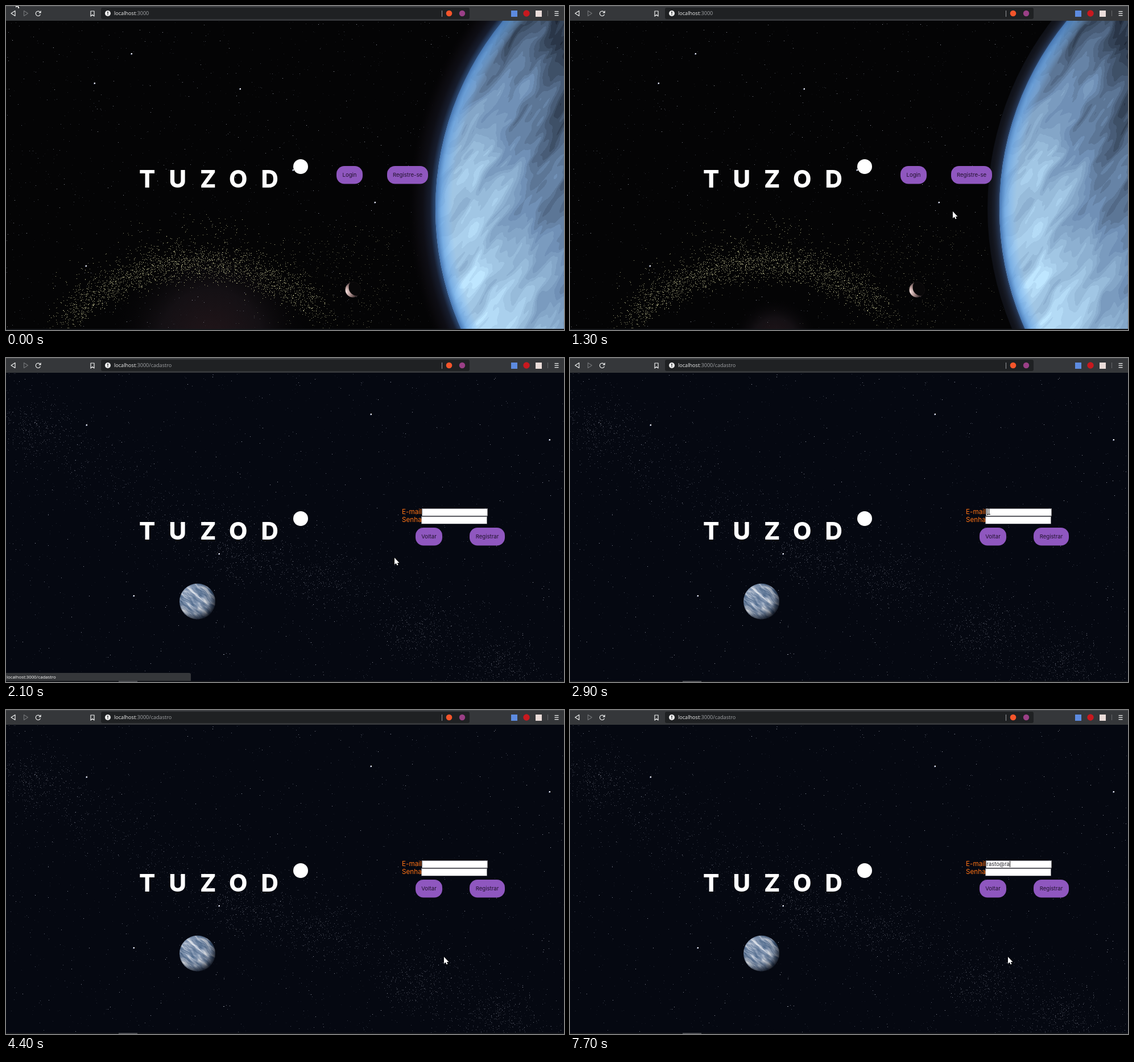
Recreate the animation shown at these times as an HTML page with a canvas. Size 981 by 571 pixels, loop 8000 ms.

```html
<!DOCTYPE html>
<html lang="pt">
<head>
<meta charset="utf-8">
<title>Viagens</title>
<style>
html, body { margin: 0; width: 100%; height: 100%; overflow: hidden; background: #040405; }
canvas { display: block; }
</style>
</head>
<body>
<canvas id="stage" width="981" height="571"></canvas>
<script>
const W = 981, H = 571, LOOP = 8000, TOP = 27;
const TAU = Math.PI * 2;
const ctx = document.getElementById('stage').getContext('2d');
const UI = '"Open Sans", "Noto Sans", sans-serif';
const BODY = 'Inter, "Open Sans", sans-serif';

const mix = (a, b, f) => a + (b - a) * f;
const clamp = v => Math.min(1, Math.max(0, v));

function seeded(a) {
  const rnd = () => {
    a = (a + 0x6D2B79F5) | 0;
    let t = Math.imul(a ^ (a >>> 15), 1 | a);
    t = (t + Math.imul(t ^ (t >>> 7), 61 | t)) ^ t;
    return ((t ^ (t >>> 14)) >>> 0) / 4294967296;
  };
  rnd.gauss = () => rnd() + rnd() + rnd() + rnd() - 2;
  return rnd;
}

function hash(i, j) {
  const s = Math.sin(i * 127.1 + j * 311.7) * 43758.5453;
  return s - Math.floor(s);
}

function noise(x, y) {
  const i = Math.floor(x), j = Math.floor(y);
  const ease = f => f * f * (3 - 2 * f);
  const u = ease(x - i);
  return mix(mix(hash(i, j), hash(i + 1, j), u),
    mix(hash(i, j + 1), hash(i + 1, j + 1), u), ease(y - j));
}

function layer(w, h, paint) {
  const c = document.createElement('canvas');
  c.width = w; c.height = h;
  paint(c.getContext('2d'));
  return c;
}

function disc(g, x, y, r, fill) {
  g.fillStyle = fill;
  g.beginPath();
  g.arc(x, y, r, 0, TAU);
  g.fill();
}

function poly(g, pts, fill) {
  g.beginPath();
  pts.forEach(([x, y]) => g.lineTo(x, y));
  g.closePath();
  if (fill) { g.fillStyle = fill; g.fill(); }
}

function rect(g, x, y, w, h, fill, r = 0) {
  g.fillStyle = fill;
  g.beginPath();
  g.roundRect(x, y, w, h, r);
  g.fill();
}

function label(g, text, x, y, font, fill, align = 'left') {
  g.font = font;
  g.fillStyle = fill;
  g.textAlign = align;
  g.fillText(text, x, y);
}

function radial(g, x, y, r0, r1, ...colors) {
  const fill = g.createRadialGradient(x, y, r0, x, y, r1);
  colors.forEach((c, i) => fill.addColorStop(i / (colors.length - 1), c));
  return fill;
}

function dot(g, x, y, color, alpha, size = 1) {
  g.globalAlpha = alpha;
  g.fillStyle = color;
  g.fillRect(Math.round(x), Math.round(y), size, size);
  g.globalAlpha = 1;
}

function sky(g, rnd, count, tint) {
  for (let i = 0; i < count; i++) {
    const big = i % 9 === 0;
    dot(g, rnd() * W, TOP + rnd() * 540, big ? '#d5daea' : tint,
      big ? 0.35 + rnd() * 0.4 : 0.1 + 0.45 * rnd() ** 3);
  }
}

function brightStars(g, list) {
  list.forEach(([x, y]) => {
    dot(g, x - 1, y, '#aebbe8', 0.45, 3);
    dot(g, x, y, '#ffffff', 0.9, 2);
  });
}

function ring(g, color) {
  const rnd = seeded(41);
  for (let i = 0; i < 2700; i++) {
    const x = 325 + (rnd() - 0.5) * 450 + rnd.gauss() * 32;
    let y = 455 + 105 * ((x - 340) / 247) ** 2 + rnd.gauss() * 29;
    if (rnd() < 0.25) y += Math.log(1 - rnd() * 0.95) * 30;
    if (y < 567) dot(g, x, y, color, 0.5 + rnd() * 0.5);
  }
  for (let i = 0; i < 420; i++) {
    dot(g, 600 + rnd.gauss() * 110, 385 + rnd() * 182, color, 0.15 + rnd() * 0.5);
  }
}

// Streaked ball in flat tones; light(x, y) gives its brightness from 0 to 1
function globe(g, cx, cy, r, scale, angle, contrast, ramp, light) {
  const x0 = Math.floor(cx - r), y0 = Math.max(0, Math.floor(cy - r));
  const w = Math.min(W, Math.ceil(cx + r)) - x0, h = Math.min(H, Math.ceil(cy + r)) - y0;
  const cos = Math.cos(angle), sin = Math.sin(angle);
  const skin = layer(w, h, s => {
    const img = s.createImageData(w, h);
    for (let k = 0; k < w * h; k++) {
      const x = x0 + k % w, y = y0 + Math.floor(k / w);
      const u = (x * cos + y * sin) / scale;
      const v = (y * cos - x * sin) / scale + 16 * noise(x / scale / 50, y / scale / 50);
      const n = 0.65 * noise(u / 85, v / 22) + 0.35 * noise(u / 32, v / 7) - 0.5;
      const tone = Math.round(clamp(light(x, y) + n * contrast) * 16) / 8;
      const i = tone < 1 ? 0 : 1;
      for (let c = 0; c < 3; c++) img.data[k * 4 + c] = mix(ramp[i][c], ramp[i + 1][c], tone - i);
      img.data[k * 4 + 3] = 255;
    }
    s.putImageData(img, 0, 0);
  });
  g.save();
  g.beginPath();
  g.arc(cx, cy, r, 0, TAU);
  g.clip();
  g.drawImage(skin, x0, y0);
  g.restore();
}

function planet(g, soft) {
  const x = 1277, y = 357, r = 522, reach = r + (soft ? 48 : 21);
  disc(g, x, y, reach, soft
    ? radial(g, x, y, r - 3, reach, '#33598c', '#171d2e', '#0e0e15', '#09080b', 'rgba(6,5,7,0)')
    : radial(g, x, y, r - 3, reach, '#33598c', '#222f48', '#191e2b', '#12141c', '#0e1017'));
  globe(g, x, y, r, 1, -0.95, 0.42, [[32, 41, 56], [112, 144, 182], [190, 230, 255]],
    (px, py) => 0.6 - 0.0027 * (px - 800) + 0.0008 * (py - TOP)
      - 0.18 * clamp(1 - (r - Math.hypot(px - x, py - y)) / 60));
  disc(g, x, y, r, radial(g, x, y, r - 30, r,
    'rgba(130,188,244,0)', 'rgba(122,180,240,.4)', 'rgba(100,162,228,.65)', '#4474b0'));
}

function moon(g) {
  g.save();
  g.beginPath();
  g.arc(610, 500, 13.5, 0, TAU);
  g.clip();
  g.fillStyle = radial(g, 597, 504, 1, 19, '#f6dfdc', '#a98c8a', '#3d2f30');
  g.fillRect(594, 484, 34, 34);
  disc(g, 617, 496, 14.5, '#080708');
  g.restore();
}

function wordmark(g) {
  g.letterSpacing = '24px';
  label(g, 'TUZOD', 234, 320, '800 42px ' + BODY, '#fff');
  g.letterSpacing = '0px';
  disc(g, 518, 283, 13, '#fff');
}

function button(g, text, x, y, w) {
  rect(g, x, y, w, 31.5, '#8f57bf', 14);
  label(g, text, x + w / 2, y + 19.2, '9.6px ' + BODY, '#20122c', 'center');
}

function chrome(g) {
  const light = '#eceded', bar = '#1f2123';
  rect(g, 0, 0, W, 26, '#35373a');
  rect(g, 0, 0, W, 1, '#4a4c4f');
  rect(g, 167, 3, 648, 20, bar, 3);
  g.lineWidth = 1.2;
  g.lineJoin = 'round';
  [[9, 7, light], [38.5, -7, '#707275']].forEach(([x, d, color]) => {
    g.strokeStyle = color;
    poly(g, [[x, 13], [x + d, 8.5], [x + d, 17.5]]);
    g.stroke();
  });
  g.strokeStyle = light;
  poly(g, [[149, 9], [155, 9], [155, 18], [152, 15.4], [149, 18]]);
  g.stroke();
  g.beginPath();
  g.arc(56.5, 13.3, 4.2, 0.35, 5.4);
  g.stroke();
  poly(g, [[61.6, 8], [61.6, 12.4], [57.2, 12.4]], light);
  disc(g, 179, 13, 5, '#f2f2f2');
  rect(g, 178.3, 9.8, 1.4, 4, bar);
  rect(g, 178.3, 14.7, 1.4, 1.4, bar);
  rect(g, 766, 8, 1, 11, '#96989b');
  rect(g, 952, 8, 1, 10, '#646669');
  disc(g, 779, 13, 5.3, '#f4552b');
  disc(g, 802, 13, 5.2, '#9a3f86');
  rect(g, 888, 8, 11, 11, '#5d8be0');
  disc(g, 915, 13, 5.7, '#c8191f');
  rect(g, 931, 8, 11, 11, '#eadcd9');
  for (let i = 0; i < 3; i++) rect(g, 964.5, 9 + i * 3.5, 7, 1.3, light);
  rect(g, 0, 569, W, 2, '#15171b');
}

function home(tint, soft) {
  return layer(W, H, g => {
    rect(g, 0, 0, W, H, '#040405');
    const reach = soft ? 175 : 75;
    disc(g, 360, 590, reach, radial(g, 360, 590, 5, reach, '#211519', '#141014', 'rgba(5,4,6,0)'));
    sky(g, seeded(7), 1900, '#9ba4b8');
    brightStars(g, [[155, 135], [220, 83], [411, 145], [648, 345], [140, 457], [504, 288]]);
    ring(g, tint);
    moon(g);
    planet(g, soft);
    wordmark(g);
    button(g, 'Login', 581, 282, 46);
    button(g, 'Registre-se', 670, 282, 72);
    chrome(g);
  });
}

function earth(g) {
  const x = 336.5, y = 429, r = 31.5;
  globe(g, x, y, r, 0.2, 0.7, 1.1, [[58, 88, 124], [130, 149, 176], [238, 240, 244]], () => 0.5);
  disc(g, x, y, r + 0.5, radial(g, 328, 420, 18, 45, 'rgba(5,8,17,0)', 'rgba(5,8,17,.2)', 'rgba(5,8,17,.95)'));
}

function signup() {
  return layer(W, H, g => {
    rect(g, 0, 0, W, H, '#050811');
    const rnd = seeded(63);
    sky(g, rnd, 2300, '#9098ac');
    for (let i = 0; i < 1900; i++) {
      const x = rnd() * W;
      const y = 95 + x * 0.53 + 25 * Math.sin(x / 150) + rnd.gauss() * 80;
      dot(g, x, Math.max(TOP, y), '#a0a6b8', 0.12 + rnd() * 0.33);
    }
    [[50, 125], [415, 350], [550, 388], [725, 490], [860, 540]].forEach(([x, y]) => {
      for (let i = 0; i < 260; i++) {
        dot(g, x + rnd.gauss() * 58, y + rnd.gauss() * 40, '#b4b8c8', 0.12 + rnd() * 0.4);
      }
    });
    brightStars(g, [[141, 117], [641, 98], [374, 344], [224, 418], [955, 143]]);
    earth(g);
    wordmark(g);
    ['E-mail', 'Senha'].forEach((name, i) => {
      const x = 731 - i, y = 265 + i * 14;
      label(g, name, 696, y + 10.4, '11.7px ' + BODY, '#ff7315');
      rect(g, x, y, 116, 13.5, '#77777c');
      rect(g, x + 1, y + 1, 114, 12, '#fff');
    });
    button(g, 'Voltar', 720, 299, 47);
    button(g, 'Registrar', 815, 299, 62);
    chrome(g);
  });
}

const pages = {
  first: home('#cdcc9b', true),
  idle: home('#cdcc9b', false),
  leave: home('#e0e0e3', false),
  form: signup()
};

// Pointer stops: time, x, y
const STOPS = [[0, 17, -9], [100, 13, 0], [600, 281, 326], [700, 281, 326], [900, 311, 344], [1000, 311, 344],
  [1300, 673, 362], [1700, 700, 305], [2000, 698, 313], [2100, 683, 352], [2600, 742, 271],
  [2900, 736, 270], [3200, 840, 305], [3500, 770, 435]];

function pointerAt(t) {
  const next = STOPS.findIndex(s => s[0] > t);
  if (next < 0) return STOPS[STOPS.length - 1].slice(1);
  const a = STOPS[next - 1], b = STOPS[next];
  const f = (t - a[0]) / (b[0] - a[0]);
  return [mix(a[1], b[1], f), mix(a[2], b[2], f)];
}

// Keys pressed after the click ('<' is backspace) and their times in tenths of a second
const KEYS = ['', 'a', '<', 'r', 'a', 's', 't', 'o', "'", '<', '@', 'ra'];
const TIMES = [29, 45, 48, 49, 50, 52, 54, 55, 58, 64, 68, 77];

function field(t) {
  const count = TIMES.filter(at => at * 100 <= t).length;
  if (!count) return;
  const text = KEYS.slice(0, count).reduce((s, k) => k === '<' ? s.slice(0, -1) : s + k, '');
  label(ctx, text, 732.5, 275, '9.4px ' + BODY, '#25252a');
  if ((t - TIMES[count - 1] * 100) % 1000 < 500) {
    rect(ctx, Math.round(732.8 + ctx.measureText(text).width), 266, 1, 11, '#111');
  }
}

function pointer(t) {
  const [x, y] = pointerAt(t);
  const form = t >= 2100;
  const over = (l, top, w, h) => x > l && x < l + w && y > top && y < top + h;
  const hand = form ? over(720, 299, 47, 31) || over(815, 299, 62, 31)
    : over(581, 282, 46, 30) || over(670, 282, 72, 30);
  ctx.save();
  ctx.translate(Math.round(x), Math.round(y));
  ctx.lineWidth = 1;
  ctx.strokeStyle = '#111';
  if (form && over(731, 264, 116, 28)) {
    rect(ctx, 0, -5, 1, 11, '#111');
    rect(ctx, -2, -6, 5, 1, '#111');
    rect(ctx, -2, 5, 5, 1, '#111');
  } else {
    poly(ctx, hand
      ? [[-1, 0], [1, 0], [1, 5], [6, 6], [7, 8], [6, 13], [-1, 13], [-5, 8], [-4, 7], [-1, 9]]
      : [[0, 0], [0, 12], [2.8, 9.6], [4.6, 13.4], [6.5, 12.6], [4.7, 8.9], [8.4, 8.9]]);
    ctx.stroke();
    ctx.fillStyle = '#fff';
    ctx.fill();
  }
  ctx.restore();
}

function address(t) {
  const font = '9.1px ' + UI;
  const moved = t >= 2000;
  label(ctx, 'localhost', 190, 16.4, font, '#f0f0f0');
  const rest = 190 + ctx.measureText('localhost').width;
  label(ctx, ':3000' + (moved ? '/cadastro' : ''), rest, 16.4, font, '#a0a2a5');
  if (moved) rect(ctx, 198, 569, 33, 2, '#4a4c50');
  if (moved && t < 2600) {
    rect(ctx, 0, 555, 325, 14, '#35373a', [0, 3, 0, 0]);
    label(ctx, 'localhost:3000/cadastro', 1, 565, '7.8px ' + UI, '#fff');
  }
}

function frame(now) {
  const t = Math.floor((now % LOOP) / 100) * 100;
  const page = t < 100 ? 'first' : t < 2000 ? 'idle' : t < 2100 ? 'leave' : 'form';
  ctx.drawImage(pages[page], 0, 0);
  address(t);
  field(t);
  pointer(t);
  requestAnimationFrame(frame);
}
requestAnimationFrame(frame);
</script>
</body>
</html>
```
